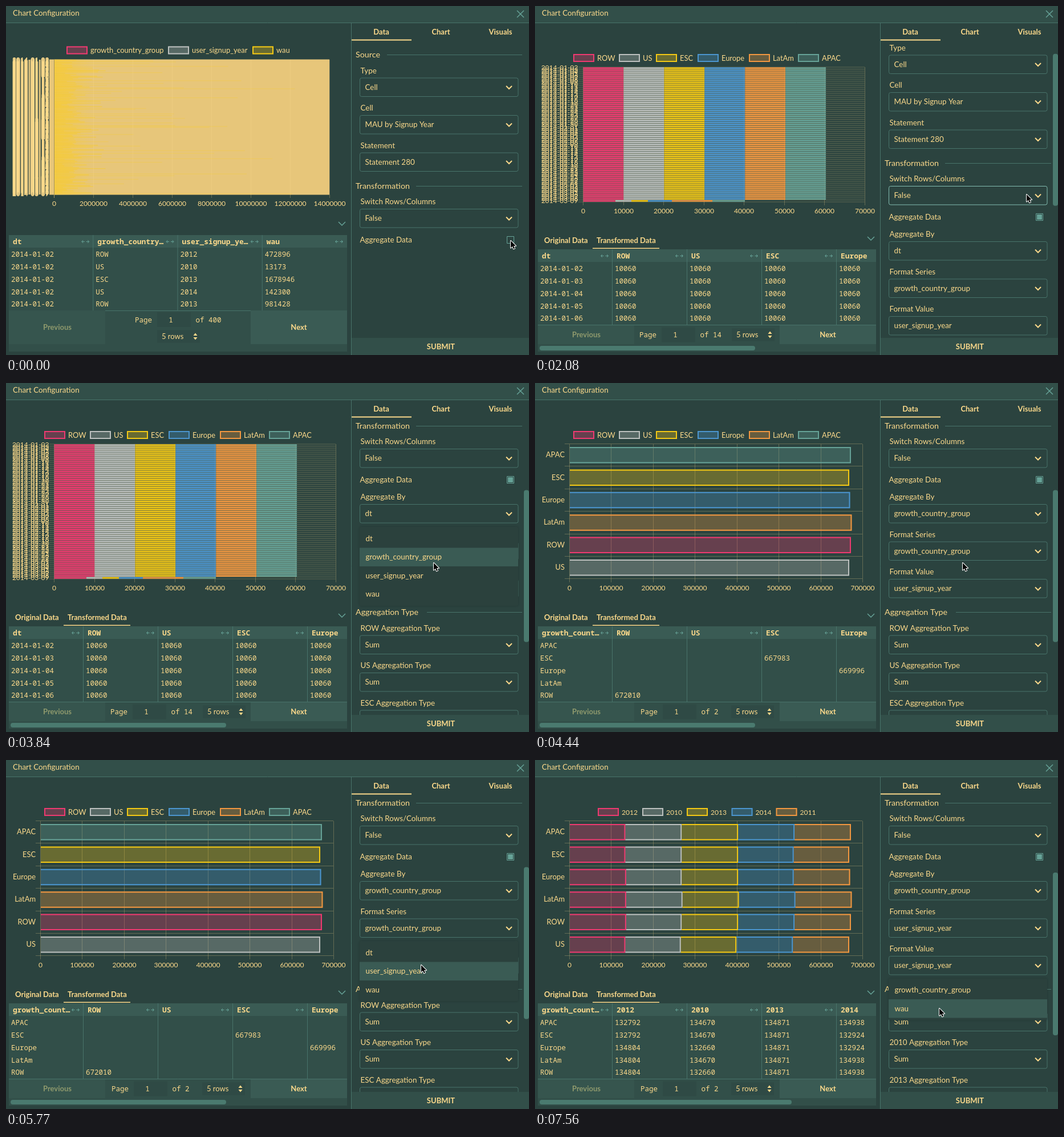
An HTML page with a canvas for the animation above (8000 ms loop, 917 px wide and 611 px high).

```html
<!DOCTYPE html>
<html lang="en">
<head>
<meta charset="utf-8">
<title>Chart Configuration</title>
<style>
  html, body { margin: 0; width: 100%; height: 100%; overflow: hidden; background: #2b433f; }
  canvas { display: block; }
</style>
</head>
<body>
<canvas id="stage" width="917" height="611"></canvas>
<script>
const ctx = document.getElementById('stage').getContext('2d');
const LOOP = 8000;
const BG = '#2b433f', BAR = '#324f49', HEAD = '#3a5b54', BORDER = '#48736a', THUMB = '#4a7a6f';
const CREAM = '#fbd98b', TEAL = '#66a297', GRID = 'rgba(251,217,139,.27)';
const PINK = '#ee3a70', GRAY = '#bcc0be', YELLOW = '#f3c814', BLUE = '#4b95cf', ORANGE = '#f29740';
const SERIES = [PINK, GRAY, YELLOW, BLUE, ORANGE, TEAL];
const GROUP = 'growth_country_group', YEAR = 'user_signup_year';

const sans = (px = 13.4, weight = 400) => `${weight} ${px}px Lato, sans-serif`;
const mono = (px = 12.5, weight = 400) => `${weight} ${px}px "Noto Sans Mono", monospace`;
const BOLD = sans(13, 700);

// [time, x, y] of the pointer; each position holds until the next
const POINTER = [
  [0, 885, 411], [300, 884, 411], [440, 883, 411],
  [1930, 878, 395], [2077, 862, 330], [2224, 840, 262], [2371, 822, 215], [2518, 810, 190], [2665, 805, 183],
  [2960, 780, 214], [3100, 766, 226], [3250, 757, 232], [3690, 752, 272], [3840, 750, 315],
  [4740, 750, 308], [4890, 744, 298], [5330, 742, 302], [5480, 738, 325], [5620, 731, 350], [5770, 728, 359],
  [7110, 725, 372], [7260, 719, 400], [7410, 712, 425], [7560, 709, 435]
];
const SCROLL = [[0, 0], [1930, 8], [2077, 40], [2224, 110], [2371, 175], [2518, 220], [2665, 240]];
const MENUS = [
  { from: 3250, to: 4440, y: 229, items: ['dt', GROUP, YEAR, 'wau'] },
  { from: 5040, to: 6220, y: 294, items: ['dt', YEAR, 'wau'] },
  { from: 6960, to: LOOP, y: 359.5, items: [GROUP, 'wau'] }
];
const held = (keys, t) => keys.findLast(k => k[0] <= t);
const noise = n => { const v = Math.sin(n * 127.1 + 3.7) * 43758.5453; return v - Math.floor(v); };

function rect(x, y, w, h, color) {
  ctx.fillStyle = color;
  ctx.fillRect(x, y, w, h);
}
function rounded(x, y, w, h, r, fill, stroke) {
  ctx.beginPath();
  ctx.roundRect(x, y, w, h, r);
  if (fill) { ctx.fillStyle = fill; ctx.fill(); }
  if (stroke) { ctx.strokeStyle = stroke; ctx.lineWidth = 1; ctx.stroke(); }
}
function line(points, color, width = 1) {
  ctx.beginPath();
  for (let i = 0; i < points.length; i += 2) ctx.lineTo(points[i], points[i + 1]);
  ctx.strokeStyle = color;
  ctx.lineWidth = width;
  ctx.stroke();
}
function text(str, x, y, font = sans(), align = 'left', color = CREAM) {
  ctx.font = font;
  ctx.textAlign = align;
  ctx.fillStyle = color;
  ctx.fillText(str, x, y + 4.6);
}
function clipped(x, y, w, h, draw) {
  ctx.save();
  ctx.beginPath();
  ctx.rect(x, y, w, h);
  ctx.clip();
  draw();
  ctx.restore();
}
const chevron = (x, y, s, color, width) => line([x - s, y - s / 2, x, y + s / 2, x + s, y - s / 2], color, width);

function tintedBox(x, y, w, h, color, openLeft) {
  ctx.globalAlpha = .3;
  rect(x, y, w, h, color);
  ctx.globalAlpha = 1;
  const path = [x, y + 1, x + w - 1, y + 1, x + w - 1, y + h - 1, x, y + h - 1];
  if (!openLeft) path.push(x, y);
  line(path, color, 2);
}
function legend(names, xs, y) {
  names.forEach((name, i) => {
    tintedBox(xs[i] + 1, y - 7, 36, 14, SERIES[i]);
    text(name, xs[i] + 42, y, sans(isNaN(name) ? 12.9 : 12.1));
  });
}
function axis(x0, x1, top, max, step) {
  const bottom = top + 236, count = max / step;
  for (let i = 0; i <= count; i++) {
    const x = Math.round(x0 + (x1 - x0) * i / count) + .5;
    line([x, top, x, bottom + 6], GRID);
    text(i * step, x, bottom + 15, sans(12.1), 'center');
  }
}
// Overlapping day labels spread evenly down the value axis
function dayLabels(count, top) {
  for (let i = 0; i < count; i++) {
    const date = new Date(Date.UTC(2014, 0, 2 + Math.floor(i * 67 / count)));
    text(date.toISOString().slice(0, 10), 75.5, top + 236 * (i + .5) / count, sans(12), 'right');
  }
}

function rawChart() {
  legend([GROUP, YEAR, 'wau'], [106, 284, 432], 77.5);
  rect(76, 93.5, 491, 237, '#e7c67a');
  const glow = ctx.createLinearGradient(85, 0, 150, 0);
  glow.addColorStop(0, 'rgba(246,203,51,.6)');
  glow.addColorStop(1, 'rgba(246,203,51,0)');
  rect(85, 93.5, 65, 237, glow);
  for (let i = 0; i < 150; i++) {
    const r = noise(i), dense = noise(i + 400);
    const reach = dense < .45 ? 12 + 30 * r : dense < .8 ? 30 + 60 * r : dense < .94 ? 90 + 155 * r : 240 + 190 * r;
    ctx.globalAlpha = reach > 90 ? .35 : .65;
    rect(85, 94 + i * 1.57, reach, 1.3, '#f6cb33');
  }
  ctx.globalAlpha = 1;
  axis(84, 567, 94, 14000000, 2000000);
  line([84.5, 94, 84.5, 336], '#a4935f');
  dayLabels(236, 92.5);
}

function dailyChart() {
  const rows = 67, pitch = 236 / rows, left = 84.5, unit = 70.5;
  legend(['ROW', 'US', 'ESC', 'Europe', 'LatAm', 'APAC'], [67, 147, 212, 285, 375, 461], 91);
  axis(84, 577.5, 107, 70000, 10000);
  for (let i = 0; i <= rows; i++) line([76, 107 + i * pitch, 578, 107 + i * pitch], GRID, .9);
  const last = [left, 141, 169, 198, 240, 311, 368];
  for (let i = 0; i < rows; i++) {
    const y = 107 + i * pitch;
    SERIES.forEach((color, k) => {
      const x = i < rows - 1 ? left + k * unit * 1.006 : last[k];
      const end = i < rows - 1 ? left + (k + 1) * unit * 1.006 : last[k + 1];
      rect(x, y + .4, end - x, 2.7, color);
    });
  }
  dayLabels(rows, 106);
}

const REGIONS = ['APAC', 'ESC', 'Europe', 'LatAm', 'ROW', 'US'];
const REGION_COLORS = [TEAL, YELLOW, BLUE, ORANGE, PINK, GRAY];
const TOTALS = [
  [132792, 134670, 134871, 134938, 134740], [132792, 134670, 134871, 132924, 132726],
  [134804, 132660, 134871, 132924, 134737], [134804, 134670, 134871, 134938, 134740],
  [134804, 132660, 134871, 134938, 134737], [132792, 132660, 132858, 134938, 134737]
];
function regionChart(stacked) {
  if (stacked) legend(['2012', '2010', '2013', '2014', '2011'], [110, 188, 266, 344.5, 422.5], 91);
  else legend(['ROW', 'US', 'ESC', 'Europe', 'LatAm', 'APAC'], [67, 147, 212, 285, 375, 461], 91);
  axis(60, 574, 107, 700000, 100000);
  for (let i = 0; i <= 6; i++) {
    const y = Math.round(106 + i * 39.4) + .5;
    line([52, y, 574, y], GRID);
  }
  REGIONS.forEach((name, i) => {
    const y = 112 + i * 39.4, sum = TOTALS[i].reduce((a, b) => a + b);
    text(name, 52, y + 13.5, sans(12.9), 'right');
    let x = 61;
    (stacked ? TOTALS[i] : [sum]).forEach((value, k) => {
      const w = value * .00073357;
      tintedBox(x, y, w, 28.5, stacked ? SERIES[k] : REGION_COLORS[i], true);
      x += w;
    });
  });
}

function resizeIcon(x, y) {
  line([x - 6, y, x - 1.5, y], TEAL);
  line([x + 1.5, y, x + 6, y], TEAL);
  line([x - 4, y - 2.5, x - 6.5, y, x - 4, y + 2.5], TEAL);
  line([x + 4, y - 2.5, x + 6.5, y, x + 4, y + 2.5], TEAL);
}
function table(top, colWidth, headers, rows) {
  rect(5, top, 593, 605 - top, BAR);
  rect(5, top, 593, 22, HEAD);
  clipped(5, top, 593, 133, () => {
    headers.forEach((name, c) => {
      const x = 5 + c * colWidth;
      text(name, x + 7, top + 11, mono(12.9, 700));
      resizeIcon(x + colWidth - 14, top + 11.5);
      if (c) line([x - .5, top, x - .5, top + 132], BORDER);
      rows.forEach((row, r) => text(row[c] ?? '', x + 4, top + 33.5 + r * 21.8, mono()));
    });
  });
  line([5, top + 132.5, 598, top + 132.5], BORDER);
}
function pager(top, pages, shift) {
  const y = (top + 592) / 2, tall = top < 540;
  rect(5, top, 169, 592 - top, '#36554e');
  rect(429, top, 169, 592 - top, HEAD);
  text('Previous', 90, y - .5, BOLD, 'center', '#8f9a6d');
  text('Next', 513.5, y - .5, BOLD, 'center');
  const x = tall ? 226 : 183 + shift, py = tall ? 549 : 575.5;
  text('Page', x, py, mono());
  rect(x + 39, py - 13, 59, 26, '#2f4a45');
  text('1', x + 63, py, mono(), 'center');
  text('of ' + pages, x + 106.5, py, mono());
  const rx = tall ? 273 : 353 - shift / 2, ry = tall ? 578.5 : 575.5;
  rect(rx - 8, ry - 11, 75, 22, '#2f4a45');
  text('5 rows', rx, ry, sans(13));
  for (const d of [-1, 1]) {
    ctx.beginPath();
    ctx.moveTo(rx + 55.5, ry + d * 1.5);
    ctx.lineTo(rx + 62.5, ry + d * 1.5);
    ctx.lineTo(rx + 59, ry + d * 6);
    ctx.fillStyle = CREAM;
    ctx.fill();
  }
}
function dataPane(stage) {
  if (stage === 0) {
    chevron(589, 381, 6, TEAL, 1.5);
    table(401, 148.25, ['dt', 'growth_country…', 'user_signup_ye…', 'wau'], [
      ['2014-01-02', 'ROW', '2012', '472896'], ['2014-01-02', 'US', '2010', '13173'],
      ['2014-01-02', 'ESC', '2013', '1678946'], ['2014-01-02', 'US', '2014', '142300'],
      ['2014-01-02', 'ROW', '2013', '981428']
    ]);
    pager(533, 400, 0);
    return;
  }
  chevron(589, 407, 6, TEAL, 1.5);
  text('Original Data', 16, 410.5, BOLD);
  text('Transformed Data', 108, 410.5, BOLD);
  rect(101, 423.5, 117, 1.5, CREAM);
  const first = stage === 1 ? 'dt' : 'growth_count…';
  const names = stage === 3 ? ['2012', '2010', '2013', '2014'] : ['ROW', 'US', 'ESC', 'Europe'];
  const rows = REGIONS.slice(0, 5).map((name, i) => {
    if (stage === 1) return ['2014-01-0' + (i + 2), ...Array(4).fill('10060')];
    if (stage === 3) return [name, ...TOTALS[i]];
    const sum = TOTALS[i].reduce((a, b) => a + b);
    return [name, ...names.map(n => n === name ? sum : '')];
  });
  table(426, 131, [first, ...names], rows);
  pager(559, stage === 1 ? 14 : 2, stage === 1 ? 0 : 2);
  rounded(8, 595, stage === 3 ? 442 : 378, 8, 4, THUMB);
}

function heading(label, y, lineStart) {
  text(label, 613, y, sans(14.3));
  line([lineStart, y + .5, 905, y + .5], BORDER);
}
function select(label, value, y, pointer, menu) {
  const covered = menu && pointer.y > menu.y + 23;
  const hover = !covered && pointer.x > 620 && pointer.x < 898 && Math.abs(pointer.y - y) < 16.5;
  text(label, 621.5, y - 29);
  rounded(620.5, y - 16, 277.5, 32.5, 3, null, hover ? '#82bcb0' : BORDER);
  text(value, 629.5, y);
  chevron(882, y + .5, 5, CREAM, 2);
  if (hover && menu && Math.abs(menu.y - y) < 2) line([629.5, y - 8, 629.5, y + 9], CREAM);
}
function dropdown(menu, pointer) {
  const top = menu.y + 23;
  ctx.save();
  ctx.shadowColor = 'rgba(0,0,0,.2)';
  ctx.shadowBlur = 4;
  rounded(620, top, 278, menu.items.length * 32.5 + 8, 3, '#2b413d');
  ctx.restore();
  menu.items.forEach((item, i) => {
    const y = top + 4 + i * 32.5;
    if (pointer.y >= y && pointer.y < y + 32.5) rect(620, y, 278, 32.5, HEAD);
    text(item, 630.5, y + 16);
  });
}
function settings(stage, scroll, pointer, menu) {
  const field = (label, value, y) => select(label, value, y - scroll, pointer, menu);
  clipped(606, 60, 311, 521, () => {
    heading('Source', 85 - scroll, 668);
    field('Type', 'Cell', 142);
    field('Cell', 'MAU by Signup Year', 207.5);
    field('Statement', 'Statement 280', 273);
    heading('Transformation', 315 - scroll, 719);
    field('Switch Rows/Columns', 'False', 371.5);
    text('Aggregate Data', 620.5, 409 - scroll);
    rounded(878.5, 403.5 - scroll, 12, 12, 0, null, TEAL);
    if (stage) {
      rect(880, 405 - scroll, 9, 9, TEAL);
      field('Aggregate By', stage < 2 ? 'dt' : GROUP, 468.5);
      field('Format Series', stage < 3 ? GROUP : YEAR, 534);
      field('Format Value', YEAR, 599.5);
      heading('Aggregation Type', 641 - scroll, 738);
      const names = stage === 3 ? ['2012', '2010', '2013'] : ['ROW', 'US', 'ESC'];
      names.forEach((name, i) => field(name + ' Aggregation Type', 'Sum', 698 + i * 65.5));
    }
    if (menu) dropdown(menu, pointer);
    if (stage) {
      const thumbTop = stage === 3 ? 197 : 63 + scroll * .519;
      rounded(908, thumbTop, 9, stage === 3 ? 285 : 266, 4, THUMB);
    }
  });
}

function drawPointer({ x, y }, hand) {
  const shape = hand
    ? 'M-1 0q1.500-1.500 2.500.5v4l4 1q2 .5 1.700 3l-1 5.500h-6l-4-5q-.5-1.700 1.300-1.200l1.500 1z'
    : 'M0 0v12.500l2.900-2.700 2 4.500 2.100-.9-2-4.400h4z';
  const path = new Path2D(shape);
  ctx.save();
  ctx.translate(x, y);
  ctx.lineJoin = 'round';
  ctx.lineWidth = hand ? 1.2 : 2;
  ctx.strokeStyle = hand ? '#000' : '#fff';
  ctx.fillStyle = hand ? '#fff' : '#000';
  ctx.stroke(path);
  ctx.fill(path);
  ctx.restore();
}

function draw(t) {
  const stage = t < 1040 ? 0 : t < 4440 ? 1 : t < 6220 ? 2 : 3;
  const [, x, y] = held(POINTER, t);
  const pointer = { x, y };
  const menu = MENUS.find(m => t >= m.from && t < m.to);

  rect(0, 0, 917, 611, BG);
  rect(0, 0, 917, 29, BAR);
  line([0, 29.5, 917, 29.5], BORDER);
  text('Chart Configuration', 12, 12);
  line([896, 8, 908, 20], TEAL, 1.5);
  line([908, 8, 896, 20], TEAL, 1.5);

  [rawChart, dailyChart, regionChart, () => regionChart(true)][stage]();
  dataPane(stage);

  line([605.5, 30, 605.5, 611], BORDER);
  ['Data', 'Chart', 'Visuals'].forEach((tab, i) => text(tab, 658 + i * 104.5, 45, BOLD, 'center'));
  settings(stage, held(SCROLL, t)[1], pointer, menu);
  rect(606, 58.5, 105, 2, CREAM);
  rect(606, 581, 311, 30, BAR);
  text('SUBMIT', 762.5, 596, BOLD, 'center');
  drawPointer(pointer, t >= 300 && t < 1930);
}

function tick() {
  draw(performance.now() % LOOP);
  requestAnimationFrame(tick);
}
tick();
</script>
</body>
</html>
```
